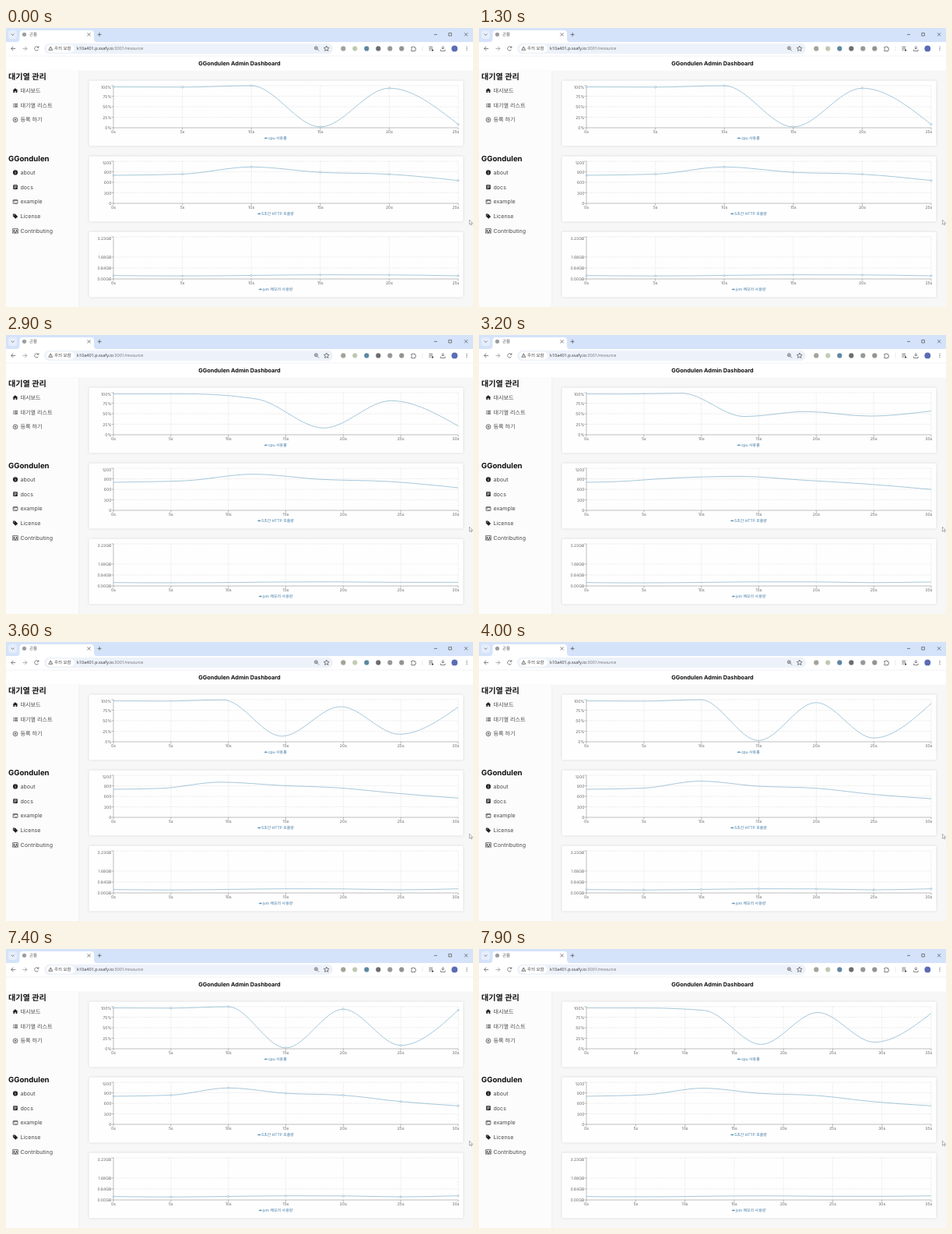
An HTML page that plays this animation: 600 by 358 pixels, repeating every 8000 ms.

```html
<!DOCTYPE html>
<html lang="ko">
<head>
<meta charset="utf-8">
<title>Admin Dashboard</title>
<style>
html, body { margin: 0; width: 100%; height: 100%; overflow: hidden; background: #f7f7f7; }
svg { display: block; width: 100%; height: 100%; }
text { font-family: Inter, "Noto Sans CJK KR", "Noto Sans CJK JP", sans-serif; text-rendering: geometricPrecision; }
.bar text { font-family: "Open Sans", "Noto Sans CJK KR", sans-serif; font-size: 5.5px; }
.ink { fill: none; stroke: #555; stroke-width: .75; }
.head { font-size: 9.6px; font-weight: 700; fill: #111; }
.item { font-size: 7.1px; fill: #4a4a4a; }
.tick { font-size: 5.1px; fill: #666; }
.legend { font-size: 4.95px; fill: #3f7aa6; }
.card { fill: #fefefe; filter: drop-shadow(0 .6px .8px rgba(0,0,0,.16)); }
.grid { fill: none; stroke: #ccc; stroke-width: .45; stroke-dasharray: 1.4 1.4; }
.axis { fill: none; stroke: #777; stroke-width: .47; }
.line { fill: none; stroke: #6ea3c3; stroke-width: .6; }
.key { fill: none; stroke: #4682a9; stroke-width: .65; }
.dot { fill: #fff; stroke: #6ea3c3; stroke-width: .5; }
</style>
</head>
<body>
<svg id="stage" viewBox="0 0 600 358">
  <g class="bar">
    <rect width="600" height="18" fill="#d5e3fa"/>
    <rect x="3" y="3" width="11" height="11" rx="3" fill="#e6eefc"/>
    <path class="ink" d="M6.8 7.6l1.8 1.8 1.8-1.8"/>
    <path d="M13.5 18q4 0 4-4V7q0-4 4-4h87.5q4 0 4 4v7q0 4 4 4z" fill="#fff"/>
    <circle cx="23.5" cy="8.3" r="2.6" fill="#9a9da1"/>
    <text x="30" y="10.3" fill="#555">곤듈</text>
    <path class="ink" d="M104.6 6.4l4 4m0-4l-4 4M117.6 8.4h5m-2.5-2.5v5"/>
    <path class="ink" d="M550 8.4h4M568.8 6.4h3.6v3.6h-3.6zM589 6.2l4.2 4.2m0-4.2l-4.2 4.2"/>
    <rect y="18" width="600" height="18" fill="#fff"/>
    <path class="ink" d="M12.2 26.4H6.8m2.5-2.6l-2.6 2.6 2.6 2.6M41.5 25a2.6 2.6 0 1 0 .1 2.6M41.9 23.2v2h-2"/>
    <path class="ink" d="M21.5 26.4h5.3m-2.5-2.6l2.6 2.6-2.6 2.6" opacity=".65"/>
    <rect x="49" y="19.8" width="371" height="13.4" rx="6.7" fill="#edf2fa"/>
    <rect x="52" y="21.4" width="36" height="10.2" rx="5.1" fill="#fff"/>
    <path d="M57.3 23.8l2.5 4.5h-5z" fill="none" stroke="#444" stroke-width=".7"/>
    <path d="M57.3 25.2v1.4m0 .4v.6" stroke="#444" stroke-width=".5"/>
    <text x="62" y="28.3" fill="#444">주의 요함</text>
    <text x="91" y="28.3" fill="#333">k10a401.p.ssafy.io<tspan fill="#707070">:3001/resource</tspan></text>
    <g class="ink">
      <circle cx="398.4" cy="25.7" r="2"/>
      <path d="M400 27.3l2 2M397.5 25.7h1.8m-.9-.9v1.8"/>
      <path d="M411.8 23l1 2.2 2.4.2-1.8 1.6.6 2.4-2.2-1.3-2.2 1.3.6-2.4-1.8-1.6 2.4-.2z"/>
    </g>
    <circle cx="433.3" cy="26.4" r="3.1" fill="#a3a39b"/>
    <circle cx="448.3" cy="26.4" r="3.1" fill="#c3cdb6"/>
    <rect id="blink" x="446" y="24.4" width="3" height="3.6" rx="1"/>
    <circle cx="463.3" cy="26.4" r="3.1" fill="#5d87a3"/>
    <circle cx="478.3" cy="26.4" r="3.1" fill="#6b6d70"/>
    <circle cx="493.3" cy="26.4" r="3.1" fill="#96989a"/>
    <circle cx="508.3" cy="26.4" r="3.1" fill="#96938f"/>
    <path class="ink" d="M520.8 24.6h1.5a.9.9 0 0 1 1.8 0h1.6v1.6a1 1 0 0 1 0 2v1.4h-4.9v-1.5a1 1 0 0 0 0-1.9z"/>
    <path stroke="#ddd" stroke-width=".6" d="M535 23v7"/>
    <path class="ink" d="M543.4 24.2h4.8m-4.8 2h4.8m-4.8 2h2.5M561.3 23v4m-1.9-1.8l1.9 1.9 1.9-1.9M558.5 27.6v1.8h5.6v-1.8"/>
    <path fill="#444" d="M547 27l2.8 1.5-2.8 1.5z"/>
    <circle cx="576.3" cy="26.4" r="3.9" fill="#5b6cb5"/>
    <g fill="#555"><circle cx="592" cy="24.3" r=".6"/><circle cx="592" cy="26.4" r=".6"/><circle cx="592" cy="28.5" r=".6"/></g>
  </g>

  <rect y="36" width="600" height="18.5" fill="#fff"/>
  <path d="M0 36h600" stroke="#e4e7ec" stroke-width=".5"/>
  <text x="300" y="48.3" text-anchor="middle" font-size="7.3" font-weight="700" fill="#111">GGondulen Admin Dashboard</text>
  <rect y="54.5" width="93.5" height="303.5" fill="#fcfcfc"/>
  <path d="M93.7 54.5V358" stroke="#ececec" stroke-width=".6"/>

  <text class="head" x="3" y="66" style="font-size:10.1px">대기열 관리</text>
  <text class="head" x="3" y="171">GGondulen</text>
  <g id="menu"></g>
  <g fill="#222">
    <path d="M8.4 80.3l3.5-3.1 3.5 3.1h-1v2.7h-1.8v-2.1h-1.4V83H9.4v-2.7z"/>
    <path d="M9 97h.8v.8H9zM9 98.8h.8v.8H9zM9 100.6h.8v.8H9zM10.6 97h4.4v.8h-4.4zM10.6 98.8h4.4v.8h-4.4zM10.6 100.6h4.4v.8h-4.4z"/>
    <circle cx="12" cy="185.4" r="3.1"/>
    <rect x="9.2" y="201.3" width="5.6" height="5.6" rx=".7"/>
    <path d="M8.9 238.6h2.8l3.5 3.3-2.9 2.9-3.4-3.4z"/>
    <circle cx="10.5" cy="259.8" r=".9"/>
    <circle cx="13.5" cy="259.8" r=".9"/>
  </g>
  <path d="M12 184.9v2.1m0-3.5v.7M10.4 202.8h3.2m-3.2 1.3h3.2m-3.2 1.3h2" stroke="#fff" stroke-width=".7"/>
  <circle cx="10.3" cy="240" r=".6" fill="#fff"/>
  <g fill="none" stroke="#333" stroke-width=".7">
    <circle cx="12" cy="117.8" r="2.9"/>
    <path d="M10.5 117.8h3M12 116.3v3"/>
    <rect x="9.1" y="220.6" width="5.8" height="4.8" rx=".5"/>
    <path d="M9.1 221.3h5.8M10.3 222.5l.9.8-.9.8M12 224.3h1.5"/>
    <path d="M8.7 261.6v-4h6.6v4M8.4 263.1q0-1.9 2.1-1.9 1.5 0 1.5 1.9 0-1.9 1.5-1.9 2.1 0 2.1 1.9z"/>
  </g>

  <g id="charts"></g>
  <path d="M595.4 246.2v6l1.4-1.3 1 2 .9-.4-.9-2h1.8z" fill="#fff" stroke="#555" stroke-width=".45"/>
</svg>
<script>
const LOOP = 8000, RUN = 1500;
const LEFT = 138, RIGHT = 581, PLOT = 54;
const $ = id => document.getElementById(id);

function add(parent, tag, attrs, text) {
  const node = document.createElementNS("http://www.w3.org/2000/svg", tag);
  for (const key in attrs) node.setAttribute(key, attrs[key]);
  if (text !== undefined) node.textContent = text;
  return parent.appendChild(node);
}

const menu = [["대시보드", 80], ["대기열 리스트", 99], ["등록 하기", 117.8], ["about", 185.3],
  ["docs", 204], ["example", 222.8], ["License", 241.5], ["Contributing", 260.2]];
for (const [label, y] of menu) add($("menu"), "text", { class: "item", x: 18.5, y: y + 2.6 }, label);

// starts: when the 7th and the 8th sample arrive
const charts = [
  { base: 128, max: 100, values: [97, 96.5, 100, 2, 94, 8, 92, 7], starts: [2700, 7755],
    ticks: [[0, "0%"], [25, "25%"], [50, "50%"], [75, "75%"], [100, "100%"]], legend: "cpu 사용률", key: 331.6 },
  { base: 225, max: 1200, values: [800, 833, 1038, 885, 830, 650, 528, 525], starts: [2800, 7800],
    ticks: [[0, "0"], [300, "300"], [600, "600"], [900, "900"], [1200, "1200"]], legend: "5초간 HTTP 호출량", key: 323 },
  { base: 322, max: 3.23, values: [.26, .23, .27, .32, .31, .24, .32, .31], starts: [2480, 7500],
    ticks: [[0, "0.00GB"], [.84, "0.84GB"], [1.68, "1.68GB"], [3.23, "3.23GB"]], legend: "jvm 메모리 사용량", key: 324.6 }
];

const xAt = (i, n) => LEFT + (RIGHT - LEFT) * i / (n - 1);
const yAt = (c, v) => c.base - PLOT * v / c.max;
const sample = (c, n) => c.values.slice(0, n).map((v, i) => [xAt(i, n), yAt(c, v)]);

function build(c) {
  const g = add($("charts"), "g", {});
  const top = c.base - PLOT;
  add(g, "rect", { class: "card", x: 106.5, y: c.base - 60.5, width: 481, height: 84, rx: 1.6 });
  let rows = "", marks = `M${LEFT} ${top}V${c.base}H${RIGHT}`;
  for (const [v, label] of c.ticks) {
    const y = yAt(c, v), isTop = v === c.max;
    if (v) rows += `M${LEFT} ${y}H${RIGHT}`;
    marks += `M${LEFT - 2.6} ${y}h2.6`;
    add(g, "text", { class: "tick", x: 135.4, y: y + (isTop ? 4.4 : 2.3), "text-anchor": "end" }, label);
  }
  add(g, "path", { class: "grid", d: rows });
  c.columns = add(g, "path", { class: "grid" });
  add(g, "path", { class: "axis", d: marks });
  c.marks = add(g, "path", { class: "axis" });
  c.labels = Array.from({ length: 8 }, (_, i) =>
    add(g, "text", { class: "tick", y: c.base + 6.7, "text-anchor": "middle" }, i * 5 + "s"));
  c.line = add(g, "path", { class: "line" });
  c.dots = c.values.map(() => add(g, "circle", { class: "dot", r: 1.1 }));
  const y = c.base + 13.4;
  add(g, "path", { class: "key", d: `M${c.key} ${y}h4.6` });
  add(g, "circle", { class: "key", cx: c.key + 2.3, cy: y, r: .8 });
  add(g, "text", { class: "legend", x: c.key + 5.3, y: y + 1.8 }, c.legend);
}

// cubic-bezier(.25, .1, .25, 1)
function ease(x) {
  if (x <= 0 || x >= 1) return x <= 0 ? 0 : 1;
  const curve = (u, a, b) => 3 * a * u * (1 - u) ** 2 + 3 * b * u * u * (1 - u) + u ** 3;
  let lo = 0, hi = 1;
  for (let i = 0; i < 24; i++) {
    const mid = (lo + hi) / 2;
    if (curve(mid, .25, .25) < x) lo = mid; else hi = mid;
  }
  return curve(lo, .1, 1);
}

// monotone cubic through the points
function monotone(pts) {
  const p = pts.filter((q, i) => !i || q[0] - pts[i - 1][0] > .001);
  const n = p.length, step = [], slope = [], m = [];
  for (let i = 0; i < n - 1; i++) {
    step[i] = p[i + 1][0] - p[i][0];
    slope[i] = (p[i + 1][1] - p[i][1]) / step[i];
  }
  for (let i = 1; i < n - 1; i++) {
    const a = slope[i - 1], b = slope[i];
    const mean = (a * step[i] + b * step[i - 1]) / (step[i - 1] + step[i]);
    m[i] = (Math.sign(a) + Math.sign(b)) * Math.min(Math.abs(a), Math.abs(b), Math.abs(mean) / 2);
  }
  m[0] = (3 * slope[0] - m[1]) / 2;
  m[n - 1] = (3 * slope[n - 2] - m[n - 2]) / 2;
  let d = "M" + p[0];
  for (let i = 0; i < n - 1; i++) {
    const h = step[i] / 3, [x0, y0] = p[i], [x1, y1] = p[i + 1];
    d += `C${x0 + h} ${y0 + h * m[i]} ${x1 - h} ${y1 - h * m[i + 1]} ${x1} ${y1}`;
  }
  return d;
}

function setAxis(c, n) {
  if (c.count === n) return;
  c.count = n;
  let columns = "", marks = "";
  c.labels.forEach((label, i) => {
    label.style.display = i < n ? "" : "none";
    if (i >= n) return;
    const x = xAt(i, n);
    label.setAttribute("x", i === n - 1 ? 577.8 : x);
    if (i) columns += `M${x} ${c.base - PLOT}v${PLOT}`;
    marks += `M${x} ${c.base}v2.6`;
  });
  c.columns.setAttribute("d", columns);
  c.marks.setAttribute("d", marks);
}

function update(c, t) {
  const passed = c.starts.filter(s => t >= s).length;
  const n = 6 + passed;
  const age = passed ? (t - c.starts[passed - 1]) / RUN : 1;
  const k = ease(age), now = sample(c, n), old = sample(c, n - 1);
  const pts = now.map(([x, y], i) => {
    const [ox, oy] = old[Math.floor(i * (n - 1) / n)];
    return [ox + (x - ox) * k, oy + (y - oy) * k];
  });
  setAxis(c, n);
  c.line.setAttribute("d", monotone(pts));
  c.dots.forEach((dot, i) => {
    const shown = age >= 1 && i < n;
    dot.style.display = shown ? "" : "none";
    if (shown) {
      dot.setAttribute("cx", pts[i][0]);
      dot.setAttribute("cy", pts[i][1]);
    }
  });
}

function render(t) {
  charts.forEach(c => update(c, t));
  $("blink").setAttribute("fill", Math.floor(t / 275) % 2 ? "#c3cdb6" : "#b9c5ab");
}

charts.forEach(build);
const begin = performance.now();
function frame() {
  render((performance.now() - begin) % LOOP);
  requestAnimationFrame(frame);
}
frame();
</script>
</body>
</html>
```
